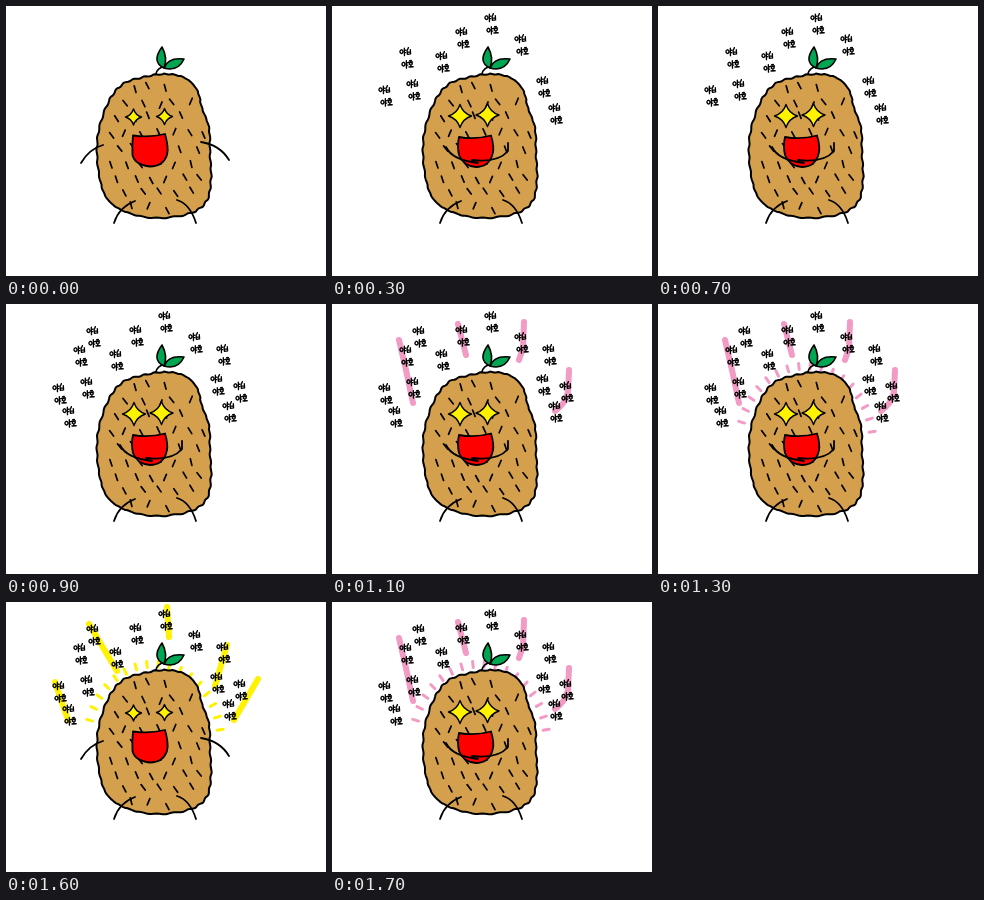
Recreate the animation shown at these times as an HTML page with a canvas. Size 320 by 270 pixels, loop 1800 ms.

```html
<!DOCTYPE html>
<html>
<head>
<meta charset="utf-8">
<style>
html, body { margin: 0; width: 100%; height: 100%; overflow: hidden; background: #fff; }
canvas { display: block; width: 320px; height: 270px; }
</style>
</head>
<body>
<canvas id="stage" width="320" height="270"></canvas>
<script>
const ctx = document.getElementById('stage').getContext('2d');
const STEP = 100, STEPS = 18;
const INK = '#000', SKIN = '#d5a04d', LEAF = '#00a651', YELLOW = '#fff200', PINK = '#f19bc5';
ctx.lineCap = ctx.lineJoin = 'round';

function draw(path, { fill, stroke = INK, width = 1.8 } = {}) {
  const shape = new Path2D(path);
  if (fill) {
    ctx.fillStyle = fill;
    ctx.fill(shape);
  }
  ctx.strokeStyle = stroke;
  ctx.lineWidth = width;
  ctx.stroke(shape);
}

function seededRandom(seed) {
  return () => (seed = seed * 16807 % 2147483647) / 2147483647;
}

// Closed Catmull-Rom curve with a slight wobble along it
function wobblyLoop(points) {
  const n = points.length, detail = 12;
  const out = [];
  for (let i = 0; i < n * detail; i++) {
    const k = Math.floor(i / detail), t = i % detail / detail;
    const [a, b, c, d] = [-1, 0, 1, 2].map(j => points[(k + j + n) % n]);
    const spline = axis => b[axis] + 0.5 * t * (c[axis] - a[axis] +
      t * (2 * a[axis] - 5 * b[axis] + 4 * c[axis] - d[axis] +
      t * (3 * (b[axis] - c[axis]) + d[axis] - a[axis])));
    const bump = 0.5 * Math.sin(i * 1.1);
    out.push([spline(0) + bump, spline(1) + bump]);
  }
  return 'M' + out.map(p => p.map(v => v.toFixed(1)).join(' ')).join('L') + 'Z';
}

const BODY = wobblyLoop([
  [160, 68], [179, 72], [191, 84], [196, 102], [203, 122], [204, 148], [205, 174], [200, 196],
  [182, 208], [148, 212], [120, 206], [103, 195], [95, 178], [91, 150], [93, 123], [103, 95], [117, 78], [138, 71]
]);

// Staggered rows of short hairs, mostly leaning the same way
function makeHairs() {
  const random = seededRandom(29);
  let path = '';
  for (let row = 0; row < 9; row++) {
    for (let col = 0; col < 8; col++) {
      const x = 96 + col * 16 + row % 2 * 8 + (random() - 0.5) * 6;
      const y = 82 + row * 15 + (random() - 0.5) * 6;
      const lean = random() < 0.75 ? 0.2 + random() * 0.5 : -0.4;
      const dx = 3.4 * Math.sin(lean), dy = 3.4 * Math.cos(lean);
      if (Math.hypot((x - 149) / 51, (y - 141) / 66) < 1) {
        path += `M${x - dx} ${y - dy}L${x + dx} ${y + dy}`;
      }
    }
  }
  return path;
}
const HAIRS = makeHairs();

// Where each two-line cheer starts; the last four join later
const CHEERS = [
  [67, 42], [103, 46], [123, 22], [152, 8], [182, 29], [74, 74], [46, 80], [204, 71], [216, 98],
  [80, 23], [56, 103], [210, 41], [227, 78]
];
const YA = 'M2.2 2A1.5 1.8 0 1 0 2.3 2M5.3 .5L5 8M5.2 3L6.5 2.6M5.1 5H6.4';
const UPPER = YA + 'M9.4 .2L8.4 2.2M7.9 2.4L8 6.8L11.2 6.6V2.4M8 4.6H11';
const LOWER = YA + 'M8.6 .6H10.3M7.6 2.2H11.4M9.5 2.6A1.5 1.2 0 1 0 9.6 2.6M9.5 5V6.8M7.6 7H11.8';

const PINK_BEAMS = 'M67 36L74 66L81 99M126 20L134 51M192 18L191 44L187 56M237 66L236 88Q234 99 223 107';
const YELLOW_BEAMS = 'M83 22L111 69M161 5L163 35M49 80L62 118M221 43L209 84M252 77L228 118';

function write(path, x, y) {
  ctx.save();
  ctx.translate(x, y);
  ctx.rotate(-0.06);
  draw(path, { width: 1.35 });
  ctx.restore();
}

function drawRays(color) {
  const count = 17;
  let path = '';
  for (let i = 0; i < count; i++) {
    const a = Math.PI * (1.09 + 0.86 * i / (count - 1));
    const c = Math.cos(a), s = Math.sin(a);
    path += `M${148 + 64 * c} ${140 + 75 * s}L${148 + 70 * c} ${140 + 81 * s}`;
  }
  draw(path, { stroke: color, width: 3 });
}

function drawEye(x, y, r) {
  const k = r * 0.24;
  draw(`M${x} ${y - r}Q${x + k} ${y - k} ${x + r} ${y}Q${x + k} ${y + k} ${x} ${y + r}` +
    `Q${x - k} ${y + k} ${x - r} ${y}Q${x - k} ${y - k} ${x} ${y - r}Z`, { fill: YELLOW, width: 1.4 });
}

function drawPotato(armsIn) {
  draw(BODY, { fill: SKIN, width: 2 });
  draw(HAIRS, { width: 1.7 });
  draw('M150 68Q151 62 159 60');
  draw('M158 62Q145 56 156 41Q162 52 158 62Z', { fill: LEAF, width: 1.6 });
  draw('M158 62Q162 51 178 53Q172 66 158 62Z', { fill: LEAF, width: 1.6 });
  draw('M108 217Q113 201 129 195M171 194Q184 198 190 217');

  if (armsIn) {
    drawEye(128, 110, 11.5);
    drawEye(155.5, 109, 11.5);
    draw('M127 131Q143 134 159 129.5Q163 142 160 150Q156 161 144 161Q131 160 127 149Q125 140 127 131Z', { fill: '#f00' });
    draw('M114 141Q120 154 146 157M140 154Q166 157 176 145V137');
  } else {
    drawEye(127.5, 111, 8);
    drawEye(158.5, 110.5, 8);
    draw('M127 129.5Q143 132 159 128Q163 142 161 149Q157 160.5 144 160.5Q129 159 126.5 149Q126 138 127 129.5Z', { fill: '#f00' });
    draw('M75 157Q83 143 97 139M195 136Q214 139 223 154');
  }
}

function cheerCount(step) {
  if (step === 0) return 0;
  return step < 8 && step % 2 ? 9 : CHEERS.length;
}

function render(step) {
  const armsIn = step % 2 === 1;
  const color = armsIn ? PINK : YELLOW;
  ctx.fillStyle = '#fff';
  ctx.fillRect(0, 0, 320, 270);
  if (step >= 10) draw(armsIn ? PINK_BEAMS : YELLOW_BEAMS, { stroke: color, width: 6 });
  if (step >= 13) drawRays(color);
  drawPotato(armsIn);
  for (const [x, y] of CHEERS.slice(0, cheerCount(step))) {
    write(UPPER, x, y);
    write(LOWER, x + 2, y + 12.5);
  }
}

const start = performance.now();
function tick(now) {
  render(Math.floor(Math.max(0, now - start) / STEP) % STEPS);
  requestAnimationFrame(tick);
}
tick(start);
</script>
</body>
</html>
```
